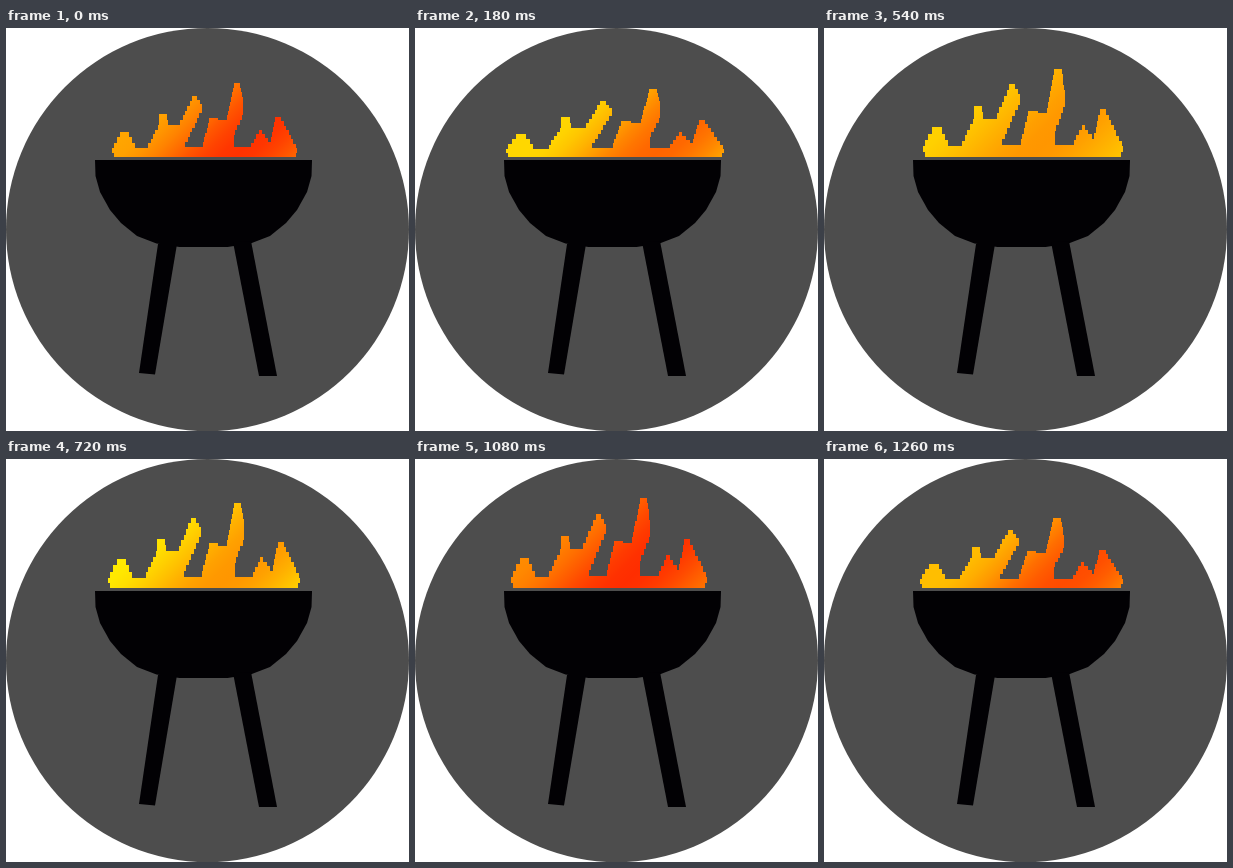
Write an HTML page with a canvas that moves like this. It is 403 by 403 pixels and loops after 1440 ms.

```html
<!DOCTYPE html>
<html lang="en">
<head>
<meta charset="utf-8">
<title>Grill</title>
<style>
  html, body { margin: 0; width: 100%; height: 100%; overflow: hidden; background: #fff; }
  canvas { display: block; }
</style>
</head>
<body>
<canvas id="stage" width="403" height="403"></canvas>
<script>
const ctx = document.getElementById('stage').getContext('2d');
const SIZE = 403, POSE_MS = 180, BASE_Y = 129;
const IRON = '#020104';

// Right half of the bowl as distance from its axis and height; the left half mirrors it.
const BOWL_X = 197.5;
const bowlSide = [[108.5, 132], [108, 148], [103.5, 164], [93.5, 182], [82.5, 195],
  [66.5, 208], [47, 215.5], [24, 219]];
const bowl = [
  ...bowlSide.map(([d, y]) => [BOWL_X + d, y]),
  ...bowlSide.map(([d, y]) => [BOWL_X - d, y]).reverse()
];
const legs = [
  [[152, 216], [171, 216], [149, 346.5], [133, 345]],
  [[227, 214], [245, 213], [271, 348], [253, 348]]
];

// Key points of the fire in a 185 x 74 box; slopes become stairs.
const FIRE_W = 185, FIRE_H = 74, STEP = 4.7;
const fire = stairs([[0, 70], [0, 65], [10, 49], [16, 49], [24, 65], [35, 65], [47, 42],
  [47, 31], [54, 31], [56, 42], [67, 42], [81, 13], [84, 13], [91, 25], [72, 64], [90, 64],
  [98, 35], [114, 37], [122, 0], [128, 0], [131, 18], [131, 32], [122, 52], [122, 64],
  [138, 64], [148, 47], [158, 59], [164, 34], [168, 34], [185, 65], [185, 70], [182, 74],
  [3, 74]]);

// Extent of the fire, and the green level where it is hottest and coolest.
const poses = [
  { left: 106, right: 291, top: 55, hot: 50, cool: 165 },
  { left: 91, right: 309, top: 61, hot: 100, cool: 215 },
  { left: 112, right: 276, top: 63, hot: 75, cool: 235 },
  { left: 99, right: 299, top: 41, hot: 150, cool: 210 },
  { left: 102, right: 294, top: 44, hot: 150, cool: 235 },
  { left: 101, right: 295, top: 73, hot: 145, cool: 255 },
  { left: 96, right: 292, top: 39, hot: 45, cool: 140 },
  { left: 96, right: 299, top: 59, hot: 75, cool: 190 }
];

function stairs(points) {
  return points.flatMap(([x, y], i) => {
    const [nextX, nextY] = points[(i + 1) % points.length];
    const dx = nextX - x, dy = nextY - y;
    const out = [[x, y]];
    if (!dx || !dy) return out;
    const steps = Math.max(1, Math.round(Math.abs(dy) / STEP));
    for (let s = 0; s < steps; s++) {
      const riserX = x + dx * (s + 0.5) / steps;
      out.push([riserX, y + dy * s / steps], [riserX, y + dy * (s + 1) / steps]);
    }
    return out;
  });
}

function fillPolygon(points, fill) {
  ctx.beginPath();
  points.forEach(([x, y]) => ctx.lineTo(x, y));
  ctx.closePath();
  ctx.fillStyle = fill;
  ctx.fill();
}

// A diagonal band of heat, eased to the cool colour on both sides.
// Lower flames have their hot band further to the right.
function heatGradient({ top, hot, cool }) {
  const center = (275 + 1.5 * top) / 2;
  const reach = 65, stops = 16;
  const glow = ctx.createLinearGradient(
    center - reach, center - reach, center + reach, center + reach);
  for (let i = 0; i <= stops; i++) {
    const t = i / stops;
    const coolness = (1 + Math.cos(2 * Math.PI * t)) / 2;
    glow.addColorStop(t, `rgb(255,${Math.round(hot + (cool - hot) * coolness)},0)`);
  }
  return glow;
}

function drawFire(pose) {
  const scaleX = (pose.right - pose.left) / FIRE_W;
  const scaleY = (BASE_Y - pose.top) / FIRE_H;
  const outline = fire.map(([x, y]) =>
    [Math.round(pose.left + x * scaleX), Math.round(pose.top + y * scaleY)]);
  fillPolygon(outline, heatGradient(pose));
}

function draw(time) {
  ctx.fillStyle = '#fff';
  ctx.fillRect(0, 0, SIZE, SIZE);
  ctx.beginPath();
  ctx.arc(SIZE / 2, SIZE / 2, SIZE / 2, 0, Math.PI * 2);
  ctx.fillStyle = '#4d4d4d';
  ctx.fill();
  [bowl, ...legs].forEach(shape => fillPolygon(shape, IRON));
  drawFire(poses[Math.floor(time / POSE_MS) % poses.length]);
}

const start = performance.now();
function tick() {
  draw(performance.now() - start);
  requestAnimationFrame(tick);
}
tick();
</script>
</body>
</html>
```
